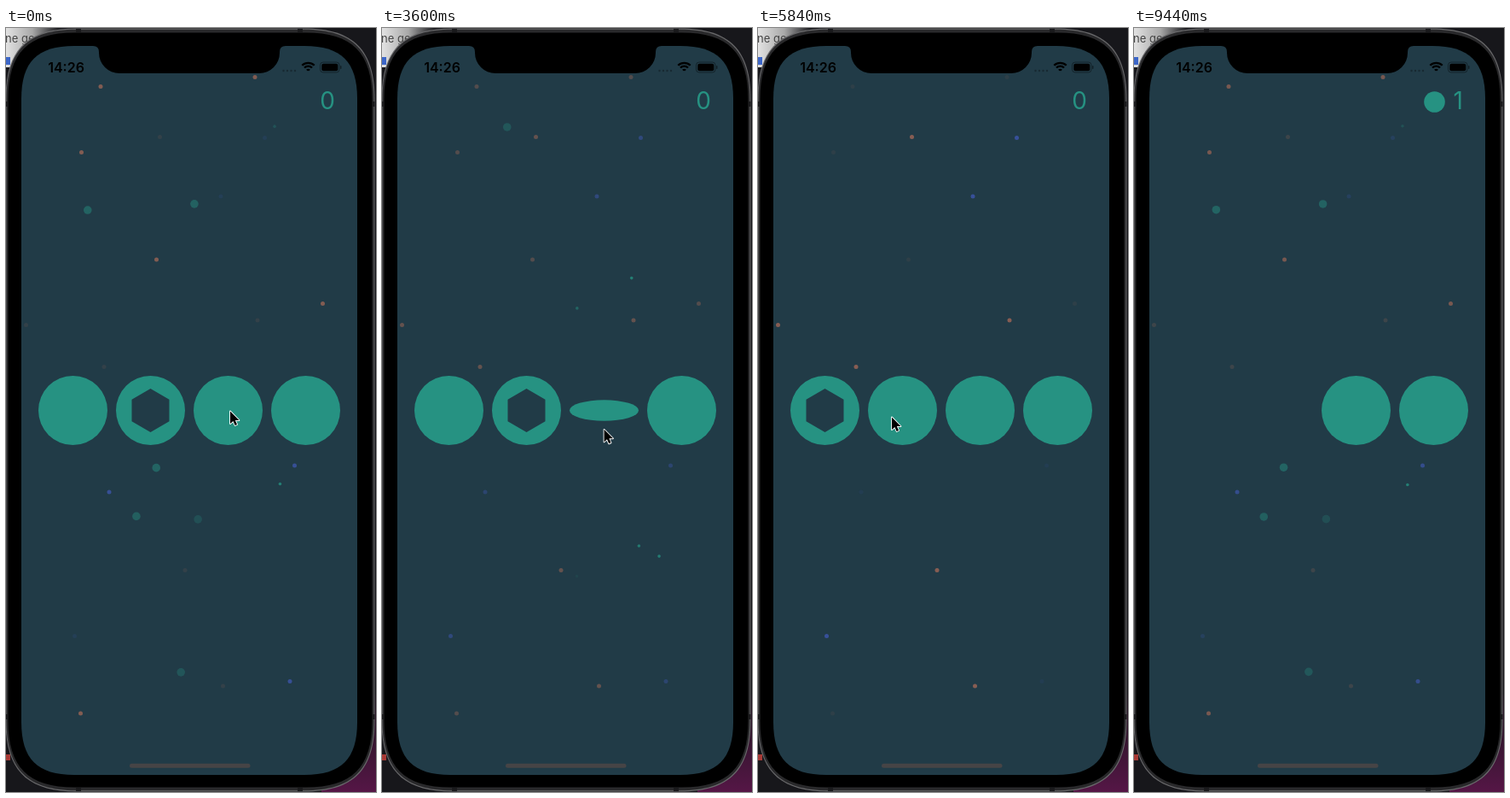
Recreate the animation shown at these times as an HTML page with a canvas. Size 434 by 894 pixels, loop 9480 ms.

```html
<!DOCTYPE html>
<html lang="en">
<head>
<meta charset="utf-8">
<title>Memory game</title>
<style>
  html, body { margin: 0; width: 100%; height: 100%; overflow: hidden; background: #17171b; }
  canvas { display: block; width: 434px; height: 894px; }
</style>
</head>
<body>
<canvas></canvas>
<script>
const W = 434, H = 894, LOOP = 9480, TAU = Math.PI * 2;
const TEAL = '#269282', NIGHT = '#213b47';
const canvas = document.querySelector('canvas');
const ctx = canvas.getContext('2d');
const dpr = window.devicePixelRatio || 1;
canvas.width = W * dpr;
canvas.height = H * dpr;

const clamp = v => Math.min(1, Math.max(0, v));
const smooth = v => v * v * (3 - 2 * v);
const mix = (a, b, k) => a + (b - a) * k;

function seededRandom(seed) {
  return () => (seed = (seed * 16807) % 2147483647) / 2147483647;
}

function disc(x, y, r, color, alpha = 1) {
  ctx.globalAlpha = alpha;
  ctx.fillStyle = color;
  ctx.beginPath();
  ctx.arc(x, y, r, 0, TAU);
  ctx.fill();
  ctx.globalAlpha = 1;
}

function box(x, y, w, h, r, color) {
  ctx.fillStyle = color;
  ctx.beginPath();
  ctx.roundRect(x, y, w, h, r);
  ctx.fill();
}

// Rectangle whose corners ease into the sides over the length e
function softBox(x, y, w, h, e, color) {
  const c = e * .3, r = x + w, b = y + h;
  ctx.fillStyle = color;
  ctx.beginPath();
  ctx.moveTo(x, y + e);
  ctx.bezierCurveTo(x, y + c, x + c, y, x + e, y);
  ctx.lineTo(r - e, y);
  ctx.bezierCurveTo(r - c, y, r, y + c, r, y + e);
  ctx.lineTo(r, b - e);
  ctx.bezierCurveTo(r, b - c, r - c, b, r - e, b);
  ctx.lineTo(x + e, b);
  ctx.bezierCurveTo(x + c, b, x, b - c, x, b - e);
  ctx.fill();
}

function text(str, x, y, font, color, align = 'left') {
  ctx.font = font + ' Inter, Roboto, sans-serif';
  ctx.fillStyle = color;
  ctx.textAlign = align;
  ctx.fillText(str, x, y);
}

// Two constellations twinkle in opposite phase; the last three stars of each are blue
const CONSTELLATIONS = [
  [[111, 68.5], [292, 57.5], [88.5, 145.5], [176.5, 271], [371.5, 322.5], [87.5, 802], [338.5, 512], [121, 543], [333, 764.5]],
  [[180.5, 127.5], [23.5, 347.5], [295, 342], [115, 396.5], [210, 634.5], [254.5, 770], [303.5, 128.5], [252, 197], [80.5, 711.5]],
];

function drawStars(t) {
  CONSTELLATIONS.forEach((stars, group) => {
    const alpha = .31 + .24 * Math.cos(TAU * ((t - 800) / 10000 - group / 2));
    stars.forEach(([x, y], i) => disc(x, y, 2.5, i < 6 ? '#dd7a5c' : '#4b62dc', alpha));
  });
}

// Sparks fade in and out while drifting, with a lull before the second half of the loop
const SPARK_LIFE = 3400, LULL_END = 6800;
const random = seededRandom(41);
const between = (a, b) => mix(a, b, random());
const sparks = Array.from({ length: 14 }, (_, i) => ({
  birth: LULL_END + random() * 5000,
  x: between(80, 330), y: between(105, 730),
  dx: between(-50, 50), dy: between(-60, 60),
  big: i % 2 === 0,
}));

function drawSparks(t) {
  for (const { birth, x, y, dx, dy, big } of sparks) {
    const k = ((t - birth + 2 * LOOP) % LOOP) / SPARK_LIFE;
    if (k >= 1) continue;
    const drift = smooth(k);
    const glow = Math.sin(k * Math.PI) * (big ? .5 : .8);
    disc(x + dx * drift, y + dy * drift, big ? 4.8 : 1.8, TEAL, glow);
  }
}

const FLIP = 400, CARD_R = 40.5, CARD_Y = 447.5, CARD_STEP = 91;
const FLY_START = 6420, FLY_END = 6690, SCORE_BALL = [352.5, 86.5];
const polygon = (sides, rx, ry) => Array.from({ length: sides }, (_, i) => {
  const a = TAU * i / sides;
  return [rx * Math.sin(a), -ry * Math.cos(a)];
});
const hexagon = polygon(6, 25.4, 25.4), diamond = polygon(4, 17.3, 25);

// Times at which each card is turned up, and mismatched pairs are turned down
const MISMATCHES = [1430, 4123];
const CARDS = [
  { hole: hexagon, ups: [5150], downs: [], matched: true },
  { hole: hexagon, ups: [-FLIP, 2060, 5940], downs: MISMATCHES, matched: true },
  { hole: diamond, ups: [773, 3440], downs: MISMATCHES },
  { hole: diamond, ups: [], downs: [] },
];

function openness(card, t) {
  const turned = times => times.reduce((sum, start) => sum + clamp((t - start) / FLIP), 0);
  return turned(card.ups) - turned(card.downs);
}

function drawCard(card, index, t) {
  if (card.matched && t >= FLY_END) return;
  const fly = card.matched ? smooth(clamp((t - FLY_START) / (FLY_END - FLY_START))) : 0;
  const open = openness(card, t);
  const size = mix(1, .3, fly);
  const squash = Math.max(.012, Math.abs(Math.cos(open * Math.PI)));
  ctx.save();
  ctx.translate(mix(78.5 + index * CARD_STEP, SCORE_BALL[0], fly), mix(CARD_Y, SCORE_BALL[1], fly));
  ctx.scale(size, size * squash);
  ctx.beginPath();
  ctx.arc(0, 0, CARD_R, 0, TAU);
  ctx.closePath();
  if (open > .48) {
    card.hole.forEach(([x, y], i) => i ? ctx.lineTo(x, y) : ctx.moveTo(x, y));
    ctx.closePath();
  }
  ctx.fillStyle = TEAL;
  ctx.fill('evenodd');
  ctx.restore();
}

function drawScore(t) {
  const scored = t >= FLY_END;
  if (scored) disc(...SCORE_BALL, 12.3, TEAL);
  text(scored ? '1' : '0', 386, 95, '400 28px', TEAL, 'right');
}

function gradient(x0, y0, x1, y1, colors) {
  const fill = ctx.createLinearGradient(x0, y0, x1, y1);
  colors.forEach((color, i) => fill.addColorStop(i / (colors.length - 1), color));
  return fill;
}

function drawDesktop() {
  box(0, 0, W, H, 0, '#17171b');
  box(0, 0, 62, 46, 0, gradient(0, 0, 62, 0, ['#e2e2e2', '#a8a8a8', '#17171b']));
  text('ne ge', -1, 17, '400 13px', '#444');
  box(0, 34, 5, 9, 0, '#3c66c8');
  box(0, 850, 5, 7, 0, '#a83a36');
  box(370, 780, 64, 114, 0, gradient(0, 780, 0, H, ['#1b161d', '#551646']));
}

function drawBody() {
  softBox(-.5, .5, 433, 893, 83, '#6a6a6c');
  softBox(.5, 1.8, 431, 890.4, 82, '#29292b');
  softBox(2.5, 5.5, 427, 883, 78, '#000');
  // Antenna bands
  for (const x of [82, 342]) for (const y of [1, 889]) box(x, y, 6, 4, 0, '#1a1a1c');
  for (const y of [86, 803]) for (const x of [0, 430]) box(x, y, 2.5, 6, 0, '#1a1a1c');
  softBox(18, 21, 394, 853, 62, NIGHT);
}

const NOTCH = new Path2D('M102 20V21Q109 21 109 28V29A24 24 0 0 0 133 53H297A24 24 0 0 0 321 29V28Q321 21 328 21V20Z');

function drawStatusBar() {
  ctx.fillStyle = '#000';
  ctx.fill(NOTCH);
  text('14:26', 70.5, 52, '600 16px', '#000', 'center');
  for (let i = 0; i < 4; i++) disc(325.5 + i * 4.5, 50, 1.2, '#000', .3);

  // Wi-Fi fan
  ctx.strokeStyle = '#000';
  ctx.lineWidth = 2.3;
  for (const r of [10.2, 6.4, 2.2]) {
    ctx.beginPath();
    ctx.arc(354.5, 51, r, -TAU * .375, -TAU * .125);
    ctx.stroke();
  }

  // Battery
  ctx.strokeStyle = 'rgba(0,0,0,.4)';
  ctx.lineWidth = 1;
  ctx.beginPath();
  ctx.roundRect(368.5, 40, 22.5, 12, 3.5);
  ctx.stroke();
  box(370.3, 41.7, 19, 8.6, 2, '#000');
  box(392, 44, 1.5, 4, 1, 'rgba(0,0,0,.45)');
}

// Pointer stops: [time, x, y]
const STOPS = [
  [0, 263, 448], [700, 263, 448], [1120, 239.5, 548], [2100, 176.5, 439], [2520, 176.5, 439],
  [3440, 262, 448], [4320, 245.5, 690], [5150, 80, 455], [5840, 157, 455], [6600, -20, 860],
];
const ARROW = new Path2D('M0 0V16.2L3.8 12.8L6.3 18.3L8.9 17.2L6.5 11.7H11.6Z');

function drawPointer(t) {
  const next = STOPS.findIndex(([time]) => time > t);
  if (next < 0) return;
  const [t0, x0, y0] = STOPS[next - 1], [t1, x1, y1] = STOPS[next];
  const k = smooth((t - t0) / (t1 - t0));
  ctx.save();
  ctx.translate(mix(x0, x1, k), mix(y0, y1, k) + .5);
  ctx.scale(.9, .9);
  ctx.lineJoin = 'round';
  ctx.lineWidth = 2;
  ctx.strokeStyle = '#fff';
  ctx.stroke(ARROW);
  ctx.fillStyle = '#000';
  ctx.fill(ARROW);
  ctx.restore();
}

function draw(now) {
  const t = now % LOOP;
  ctx.setTransform(dpr, 0, 0, dpr, 0, 0);
  drawDesktop();
  drawBody();
  drawStars(t);
  drawSparks(t);
  CARDS.forEach((card, i) => drawCard(card, i, t));
  drawScore(t);
  drawStatusBar();
  box(145, 860.7, 141.5, 5, 2.5, '#464446');
  drawPointer(t);
}

const start = performance.now();
function tick() {
  draw(performance.now() - start);
  requestAnimationFrame(tick);
}
tick();
</script>
</body>
</html>
```
